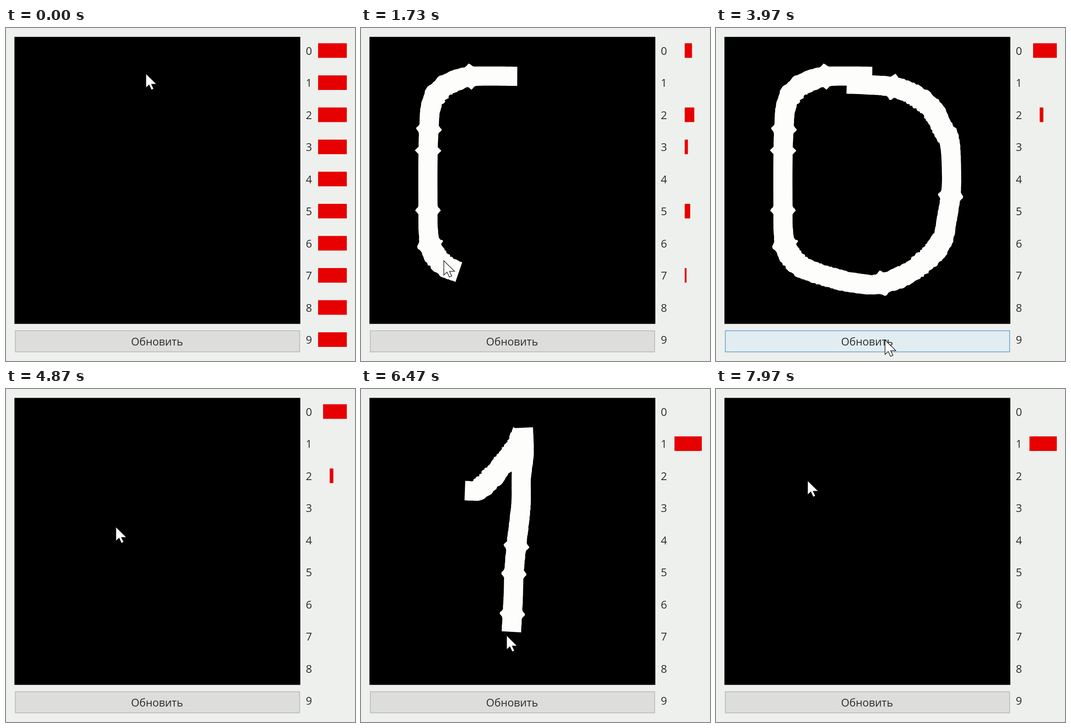
An HTML page that plays this animation: 766x731 px, repeating every 8 s.

```html
<!DOCTYPE html>
<html lang="ru">
<head>
<meta charset="utf-8">
<title>Digit sketch</title>
<style>
html, body { margin: 0; width: 100%; height: 100%; overflow: hidden; background: #eef0ed; }
svg { display: block; width: 100%; height: 100%; }
text { font: 24px "Open Sans", "Noto Sans", sans-serif; fill: #2b2b2b; }
.label { font-size: 23.4px; }
</style>
</head>
<body>
<svg viewBox="0 0 766 731">
  <rect x="18.5" y="19.5" width="627.5" height="630"/>
  <g id="ink" fill="#fdfefb"></g>
  <rect id="button" x="20.5" y="664.5" width="624" height="46.5" stroke-width="1.4"/>
  <text class="label" x="331.5" y="697" text-anchor="middle">Обновить</text>
  <g id="rows"></g>
  <path id="cursor" d="M0 0V31.5L7 25L12.2 36L17.4 33.6L12.4 23.4H23.6Z"
        fill="#fff" stroke="#111" stroke-width="1.3"/>
</svg>
<script>
const LOOP = 8000, NIB = 21, STEP = 4, LAG = 25, FULL = 63, PITCH = 70.5;
const $ = id => document.getElementById(id);
const clamp = v => Math.min(1, Math.max(0, v));
const lerp = (a, b, k) => a + (b - a) * k;
const ease = k => k * k * (3 - 2 * k);

function add(parent, tag, attrs = {}) {
  const el = document.createElementNS('http://www.w3.org/2000/svg', tag);
  for (const name in attrs) el.setAttribute(name, attrs[name]);
  return $(parent).appendChild(el);
}

let seed = 7;
const random = () => (seed = seed * 16807 % 2147483647) / 2147483647;

// Smooth curve through the key points
function curve(points) {
  const p = points.split(' ').map(s => s.split(',').map(Number));
  const at = i => p[Math.min(p.length - 1, Math.max(0, i))];
  let d = `M${p[0]}`;
  for (let i = 0; i < p.length - 1; i++) {
    const a = at(i).map((v, n) => v + (at(i + 1)[n] - at(i - 1)[n]) / 6);
    const b = at(i + 1).map((v, n) => v - (at(i + 2)[n] - at(i)[n]) / 6);
    d += `C${a} ${b} ${at(i + 1)}`;
  }
  return d;
}

// A brush line: wider and rougher on diagonals, with a small peak at each bump
function makeLine(points, bumps) {
  const el = add('ink', 'path', { d: curve(points) });
  const guide = el.cloneNode();
  const total = guide.getTotalLength();
  const point = s => guide.getPointAtLength(s);
  const edges = (s, rough) => {
    const c = point(s), a = point(Math.max(0, s - 3)), b = point(Math.min(total, s + 3));
    const d = Math.hypot(b.x - a.x, b.y - a.y);
    const tx = (b.x - a.x) / d, ty = (b.y - a.y) / d;
    const slant = Math.abs(2 * tx * ty);
    const peak = Math.max(0, ...bumps.map(m => 8 - Math.abs(s - m)));
    return [1, -1].map(side => {
      const h = side * (NIB + peak + slant * (3 + rough * (random() * 4 - 2)));
      return `${(c.x + ty * h).toFixed(1)},${(c.y - tx * h).toFixed(1)}`;
    });
  };
  const sides = [];
  for (let s = 0; s < total; s += STEP) sides.push(edges(s, 1));

  const draw = len => {
    if (len <= 0) return el.setAttribute('d', '');
    const end = Math.min(len, total);
    const part = sides.slice(0, Math.ceil(end / STEP)).concat([edges(end, 0)]);
    const left = part.map(e => e[0]), right = part.map(e => e[1]).reverse();
    el.setAttribute('d', `M${left.concat(right).join(' ')}Z`);
  };
  return { total, point, draw };
}

// pace: [time, share drawn]; bars: [time, widths by row]; hover: pointer over the button
const digits = [
  {
    lines: [makeLine(`343,106 250,106 211,114 177,133 155,166 149,222 147,290 147,390 148,450 156,487
      178,517 206,533 275,554 330,563 357,562 390,553 429,534 470,501 497,464 506,423 515,367 517,320
      513,251 499,224 473,177 430,144 384,129 339,125 287,123`.replace(/\s+/g, ' '),
      [103, 269, 316, 447, 522, 769, 1034, 1335])],
    pace: [[500, 0], [1730, 0.427], [2830, 0.99], [2880, 1]],
    bars: [[500, { 0: 8, 2: 12, 3: 3, 5: 14, 7: 9 }], [1730, { 0: 16, 2: 21, 3: 7, 5: 12, 7: 4 }],
      [2830, { 0: 52, 2: 7 }], [2880, { 0: 52, 2: 8 }]],
    hover: [3440, 4360], clear: 4280
  },
  {
    lines: [makeLine('228,223 255,222 280,202 310,167 340,128 355,92', []),
      makeLine('356,85 358,140 352,190 351,255 342,335 336,400 334,460 330,533', [261, 322, 410])],
    pace: [[5230, 0], [5770, 0.447], [6350, 1]],
    bars: [[5230, { 0: 10, 2: 14, 5: 12, 7: 12 }], [5770, { 0: 4, 2: 7, 5: 17, 7: 29 }],
      [6350, { 1: 60 }]],
    hover: [7120, 7520], clear: 7450
  }
];

// Pointer stops: [time, x, y]
const stops = [
  [200, 307, 100], [500, 322, 85], [2880, 266, 103], [3550, 371, 685], [4320, 371, 685],
  [5100, 207, 202], [6350, 309, 512], [6670, 342, 602], [6930, 358, 652], [7060, 358, 652],
  [7240, 329, 678], [7480, 329, 678], [7870, 340, 165], [7970, 201, 201]
];

// The two keys around a time and the share between them
function span(keys, t) {
  const next = keys.findIndex(k => k[0] > t);
  if (next === 0) return [keys[0], keys[0], 0];
  if (next < 0) return [keys.at(-1), keys.at(-1), 0];
  const a = keys[next - 1], b = keys[next];
  return [a, b, (t - a[0]) / (b[0] - a[0])];
}

function drawn(digit, t) {
  const [a, b, k] = span(digit.pace, t);
  return lerp(a[1], b[1], k) * digit.lines.reduce((sum, l) => sum + l.total, 0);
}

function drawDigit(digit, t) {
  let len = t < digit.clear ? drawn(digit, t) : 0;
  for (const line of digit.lines) {
    line.draw(len);
    len -= line.total;
  }
}

function pointer(t) {
  const late = t - LAG;
  for (const digit of digits) {
    if (late < digit.pace[0][0] || late >= digit.pace.at(-1)[0]) continue;
    let len = drawn(digit, late);
    for (const line of digit.lines) {
      if (len <= line.total) {
        const p = line.point(len);
        return [p.x - NIB, p.y - NIB];
      }
      len -= line.total;
    }
  }
  const [a, b, k] = span(stops, t);
  return [1, 2].map(n => lerp(a[n], b[n], ease(k)));
}

function barWidth(row, t) {
  const digit = digits.findLast(d => t >= d.pace[0][0]);
  if (!digit) return FULL;
  const [a, b, k] = span(digit.bars, t);
  return Math.round(lerp(a[1][row] || 0, b[1][row] || 0, k));
}

const mix = (a, b, k) => `rgb(${a.map((v, i) => Math.round(lerp(v, b[i], k)))})`;

const bars = Array.from({ length: 10 }, (_, i) => {
  add('rows', 'text', { x: 658, y: 58.5 + i * PITCH }).textContent = i;
  return add('rows', 'rect', { y: 33.5 + i * PITCH, height: 32, fill: '#e60000' });
});

function render(t) {
  for (const digit of digits) drawDigit(digit, t);
  $('cursor').setAttribute('transform', `translate(${pointer(t)})`);

  bars.forEach((bar, row) => {
    const w = barWidth(row, t);
    bar.setAttribute('x', Math.min(710.5, 748 - w));
    bar.setAttribute('width', w);
  });

  const hover = digits.reduce((sum, { hover: [on, off] }) =>
    sum + clamp((t - on) / 300) - clamp((t - off) / 200), 0);
  $('button').setAttribute('fill', mix([221, 221, 220], [226, 237, 241], hover));
  $('button').setAttribute('stroke', mix([176, 177, 176], [83, 153, 203], hover));
}

function tick() {
  render(performance.now() % LOOP);
  requestAnimationFrame(tick);
}
tick();
</script>
</body>
</html>
```
